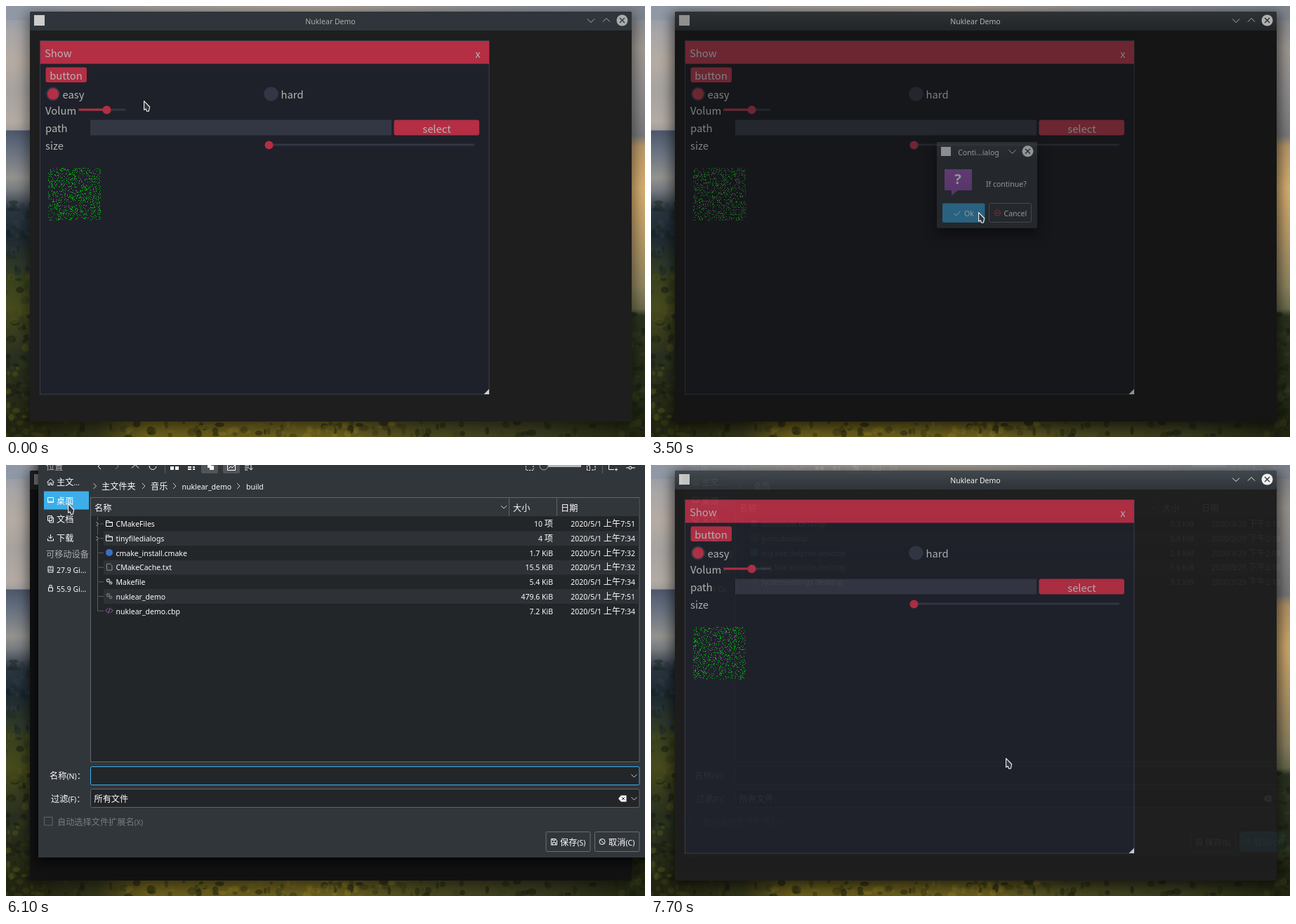
An HTML page that plays this animation: 910x615 px, repeating every 8 s.

```html
<!DOCTYPE html>
<html lang="en">
<head>
<meta charset="utf-8">
<title>Nuklear Demo</title>
<style>
html, body { margin: 0; width: 100%; height: 100%; overflow: hidden; background: #1e1e1e; }
svg { display: block; width: 910px; height: 615px; }
text { fill: #fcfcfc; }
.ui { font: 12.2px "Noto Sans", "Noto Sans CJK SC", sans-serif; }
.cjk { font-family: "Noto Sans CJK SC", sans-serif; }
.nk { font: 14.8px "Noto Sans CJK SC", sans-serif; fill: #b4b4b4; }
.shade { filter: blur(9px); }
</style>
</head>
<body>
<svg id="stage" viewBox="0 0 910 615"></svg>
<script>
const stage = document.getElementById("stage");
const RED = "#b42e44", DARK = "#323645", BLUE = "#3daee9", UI = "#31363b", VIEW = "#232629", WHITE = "#fcfcfc", EDGE = "#616569";

function el(parent, tag, attrs = {}) {
  const node = document.createElementNS("http://www.w3.org/2000/svg", tag);
  for (const k in attrs) node.setAttribute(k, attrs[k]);
  parent.append(node);
  return node;
}
const group = (parent, attrs) => el(parent, "g", attrs);
const rect = (g, x, y, width, height, fill, more) => el(g, "rect", { x, y, width, height, fill, ...more });
const disc = (g, cx, cy, r, fill, more) => el(g, "circle", { cx, cy, r, fill, ...more });
const line = (g, d, stroke = WHITE, more) => el(g, "path", { d, stroke, fill: "none", ...more });
const shape = (g, d, fill) => el(g, "path", { d, fill });
const show = (node, on) => node.setAttribute("display", on ? "inline" : "none");

// Interface text is condensed; use a smaller regular face when no condensed one exists.
const pen = document.createElement("canvas").getContext("2d");
const narrow = ["Noto Sans", "Open Sans"].find(f => {
  pen.font = `condensed 12.2px "${f}"`;
  return pen.measureText("chromium.desktop").width < 99;
});
const latin = narrow
  ? `font-family:"${narrow}",sans-serif;font-stretch:condensed`
  : "font-size:10.5px";

function label(g, x, y, str, more) {
  const t = el(g, "text", { x, y, class: "ui", ...more });
  for (const part of str.split(/([\u2e80-\uffef]+)/)) {
    if (!part) continue;
    const cjk = part.charCodeAt(0) > 0x2e7f;
    el(t, "tspan", cjk ? { class: "cjk" } : { style: latin }).textContent = part;
  }
  return t;
}
const nk = (g, x, y, str, more) => {
  const t = el(g, "text", { x, y, class: "nk", ...more });
  t.textContent = str;
  return t;
};
const MID = { "text-anchor": "middle" }, END = { "text-anchor": "end" };

const defs = el(stage, "defs");
function gradient(id, stops, across) {
  const last = stops[stops.length - 1][0];
  const g = el(defs, "linearGradient", { id, x1: 0, y1: 0, x2: across ? 1 : 0, y2: across ? 0 : 1 });
  for (const [pos, color] of stops) el(g, "stop", { offset: pos / last, "stop-color": color });
  return `url(#${id})`;
}
function random(seed) {
  let s = (seed * 7919 + 12345) >>> 0;
  return () => {
    s = (s + 0x6d2b79f5) >>> 0;
    let r = Math.imul(s ^ (s >>> 15), s | 1);
    r ^= r + Math.imul(r ^ (r >>> 7), r | 61);
    return ((r ^ (r >>> 14)) >>> 0) / 4294967296;
  };
}

function wallpaper(g) {
  rect(g, 0, 0, 60, 615, gradient("west", [[0, "#8d97a6"], [40, "#a9a6a6"], [80, "#b5aba2"], [120, "#a6a29f"],
    [165, "#b3aaa3"], [177, "#a39f9d"], [178, "#4c586b"], [205, "#66707f"], [245, "#93928f"], [262, "#777c80"],
    [290, "#2b3540"], [330, "#1f2a33"], [390, "#37401f"], [430, "#474a1c"], [500, "#2a3020"], [615, "#24260f"]]));
  rect(g, 860, 0, 50, 615, gradient("east", [[0, "#7f858e"], [60, "#a09a93"], [130, "#8c8b8c"], [185, "#7b7b7d"],
    [200, "#b9996a"], [260, "#d8b070"], [330, "#b79a68"], [400, "#8f8560"], [432, "#6d6c4c"], [442, "#2a3320"], [615, "#20260f"]]));
  rect(g, 0, 0, 910, 20, gradient("north", [[0, "#8f98a6"], [200, "#a09d9b"], [450, "#aaa196"], [700, "#8c8f96"], [910, "#7f858e"]], true));
  rect(g, 0, 580, 910, 35, gradient("south", [[0, "#22240f"], [130, "#33341a"], [200, "#6b5f1c"], [470, "#6a601f"],
    [600, "#4a4a22"], [760, "#3a3c20"], [910, "#20260f"]], true));
  const rnd = random(4);
  const leaves = (n, x, y, w, h, colors) => {
    for (let i = 0; i < n; i++)
      el(g, "ellipse", { cx: x + rnd() * w, cy: y + rnd() * h, rx: 2 + rnd() * 5, ry: 2 + rnd() * 4,
        fill: colors[Math.floor(rnd() * colors.length)], opacity: 0.55 });
  };
  leaves(40, 0, 280, 38, 110, ["#18222b", "#2c3842", "#1d2a24"]);
  leaves(70, 0, 385, 38, 220, ["#1b2114", "#4f5118", "#2e3a1c", "#171c12"]);
  leaves(50, 890, 440, 20, 170, ["#171e12", "#333d20", "#262f1c"]);
  leaves(90, 0, 594, 910, 22, ["#22260f", "#3a3c18", "#191c0e"]);
  leaves(50, 170, 596, 400, 20, ["#8a7822", "#3c3a14", "#766a24"]);
}

const chevron = (g, x, y, dir, stroke = WHITE, s = 4) => {
  const d = { down: [-s, -s / 2, s, s, s, -s], up: [-s, s / 2, s, -s, s, s],
    right: [-s / 2, -s, s, s, -s, s], left: [s / 2, -s, -s, s, s, s] }[dir];
  return line(g, `M${x + d[0]} ${y + d[1]}l${d[2]} ${d[3]}l${d[4]} ${d[5]}`, stroke);
};
function closeButton(g, x, y) {
  const d = disc(g, x, y, 8, WHITE);
  line(g, `M${x - 3.5} ${y - 3.5}l7 7m0 -7l-7 7`, UI, { "stroke-width": 1.3 });
  return d;
}

function mainWindow(g) {
  rect(g, 34, 8, 857, 585, "#1e1e1e", { rx: 3 });
  rect(g, 34, 8, 857, 27, "#2f353a", { rx: 3 });
  const glow = rect(g, 34, 8, 857, 27, gradient("bar", [[0, "#42494e"], [1, "#2f343a"]]), { rx: 3 });
  rect(g, 40, 13, 15, 15, "#cdcdcd");
  const marks = group(g);
  label(marks, 462, 25.5, "Nuklear Demo", MID);
  chevron(marks, 833, 21, "down", WHITE, 5);
  chevron(marks, 855, 20, "up", WHITE, 5);
  closeButton(marks, 877.5, 20.5);

  rect(g, 48.5, 49.5, 639.5, 504.5, "#1e2129", { stroke: "#3a3d4e" });
  rect(g, 49, 50, 639, 32.5, RED);
  nk(g, 55, 73, "Show");
  nk(g, 672, 73.5, "x", MID);
  rect(g, 56.5, 87.5, 58.5, 21.5, RED, { rx: 3 });
  nk(g, 85.5, 105, "button", MID);
  disc(g, 67, 125.5, 10, DARK);
  disc(g, 67, 125.5, 8, RED);
  nk(g, 80.5, 132, "easy");
  disc(g, 377.5, 125.5, 10.3, DARK);
  nk(g, 391.5, 132, "hard");
  nk(g, 56, 154.5, "Volum");
  rect(g, 103.5, 146.5, 66.5, 3, DARK);
  rect(g, 103.5, 146.5, 40, 3, RED);
  disc(g, 143.5, 148.3, 6, RED);
  nk(g, 56, 179.5, "path");
  rect(g, 120, 162.5, 429, 22, "#333743");
  const select = rect(g, 552.5, 162.5, 121.5, 22, RED, { rx: 3 });
  nk(g, 613.5, 180.5, "select", MID);
  nk(g, 56, 205, "size");
  rect(g, 374, 196.5, 293, 3, DARK);
  disc(g, 374.5, 198.5, 6, RED);
  shape(g, "M688 546.5V554H680.5Z", "#d0d0d0");
  const dots = ["#00b80c", "#9a3fa8"].map(fill => el(g, "path", { fill, "shape-rendering": "crispEdges" }));
  return { glow, marks, select, dots };
}

function speckle(paths, seed) {
  const rnd = random(seed + 1);
  const cells = n => Array.from({ length: n }, () => `M${60 + Math.floor(rnd() * 75)} ${231 + Math.floor(rnd() * 75)}h1v1h-1z`).join("");
  paths[0].setAttribute("d", cells(800));
  paths[1].setAttribute("d", cells(110));
}

function question(g) {
  rect(g, 405, 200, 147, 127, "#000", { class: "shade", opacity: 0.75 });
  rect(g, 407, 194, 143, 123, UI, { rx: 2 });
  rect(g, 407, 194, 143, 27, gradient("bar2", [[0, "#3c4247"], [1, UI]]), { rx: 2 });
  rect(g, 413, 201, 14, 13, "#eceeee");
  label(g, 466.5, 212.5, "Conti...ialog", MID);
  chevron(g, 514.5, 208, "down", WHITE, 5);
  closeButton(g, 536.5, 207.3);
  shape(g, "M418 233H457V263H437L428 270.5V263H418Z", gradient("violet", [[0, "#9b59b6"], [1, "#8e4cae"]]));
  el(g, "text", { x: 437, y: 254, class: "ui", style: "font-size:20px;font-weight:600", fill: WHITE, ...MID }).textContent = "?";
  label(g, 477, 257.5, "If continue?");
  const ok = rect(g, 415, 281.5, 60.5, 27.5, BLUE, { rx: 2 });
  line(g, "M431.5 296l3 3l6 -6.5");
  label(g, 446, 300, "Ok");
  rect(g, 481.5, 281.5, 60, 27, UI, { rx: 2, stroke: "#6b6f73" });
  disc(g, 493.5, 295.3, 4, "none", { stroke: "#da4453" });
  line(g, "M491 295.3h5", "#da4453");
  label(g, 502.5, 300, "Cancel");
  return ok;
}

const folderIcon = (g, x, y) => line(g, `M${x - 4.5} ${y + 4}v-8h4l1 2h4v6z M${x - 4.5} ${y - 1.5}h9`);
const icons = {
  dir: folderIcon,
  round: (g, x, y, c) => disc(g, x, y, 5, c),
  square: (g, x, y, c) => rect(g, x - 5, y - 5, 10, 10, c),
  page: (g, x, y) => line(g, `M${x - 3.5} ${y - 4.5}h5l2.5 2.5v6.5h-7.5z`, "#8a8e91"),
  gear: (g, x, y, c) => {
    disc(g, x - 1.5, y - 1.5, 2, "none", { stroke: c, "stroke-width": 1.4 });
    disc(g, x + 2.2, y + 2, 1.6, "none", { stroke: c, "stroke-width": 1.4 });
  },
  code: (g, x, y) => line(g, `M${x - 2} ${y - 3}l-3 3l3 3M${x + 2} ${y - 3}l3 3l-3 3M${x + 1} ${y - 4}l-2 8`, "#a566c0")
};

function fileList(parent, cols, day, rows) {
  const g = group(parent);
  rows.forEach(([icon, color, name, size, time], i) => {
    const y = 84 + i * 20.7;
    if (i % 2) rect(g, 139, y - 10.3, 762.5, 20.7, "#2e3236");
    line(g, `M130.5 ${y - (i ? 20 : 10)}V${y}H139`, "#5a5f63");
    if (icon === "dir") {
      rect(g, 127, y - 5, 7, 10, VIEW);
      chevron(g, 130, y, "right", "#c8cacb", 3);
    }
    icons[icon](g, 147, y - 0.5, color);
    label(g, 156.5, y + 4.3, name);
    label(g, cols.size, y + 4.3, size, END);
    label(g, 896, y + 4.3, `${day} ${time}`, END);
  });
  line(g, `M${cols.a} 46V73M${cols.b} 46V73`, EDGE);
  chevron(g, cols.a - 7.5, 60, "down", "#d0d2d3");
  label(g, cols.a + 5.5, 65.5, "大小");
  label(g, cols.b + 5.5, 65.5, "日期");
  return g;
}

function toolbar(g) {
  rect(g, 278, -12, 24, 24, "#50555a", { rx: 2 });
  rect(g, 309, -12, 24, 24, "#50555a", { rx: 2 });
  chevron(g, 133, 2, "left");
  chevron(g, 158, 2, "right", "#85898c");
  chevron(g, 184, 2, "up", WHITE, 5);
  line(g, "M204 1a5 5 0 1 0 10 1M214 0v-4");
  line(g, "M226.5 0V12M849.5 0V12", "#5b6064");
  for (const x of [234, 241]) rect(g, x, 2, 5, 5, WHITE);
  line(g, "M259 3h5M259 6h5M266 3h3M266 6h3", WHITE, { "stroke-width": 2 });
  rect(g, 287, -2, 5, 6, WHITE);
  rect(g, 290, 1, 6, 6, WHITE);
  line(g, "M315.5 -2V7.5H326.5V-2M317 5l3 -3l2 2l4 -4");
  line(g, "M340 1h6M340 4h6M340 7h4M349 -2v9l-2.5 -2.5m2.5 2.5l2.5 -2.5");
  line(g, "M740.5 -2V7.5H751V-2", WHITE, { "stroke-dasharray": "2 1.5" });
  rect(g, 770, 0, 49, 3, "#b5b8ba");
  disc(g, 766, 1, 6, UI, { stroke: "#a5a8ab" });
  line(g, "M827.5 7.5V1h4V7.5zM834 7h5V-2", WHITE, { "stroke-dasharray": "3 1" });
  line(g, "M858.5 -3V6.5H866M867 6.5h4m-2 -2v4");
  line(g, "M883 4h4m4 0h5");
  disc(g, 889, 4, 2, "none", { stroke: WHITE });
}

function fileDialog(g) {
  rect(g, 44, -20, 900, 588, "#000", { class: "shade", opacity: 0.7 });
  rect(g, 46, -10, 880, 570, UI);
  label(g, 57, 7, "位置", { opacity: 0.65 });
  toolbar(g);

  const place = rect(g, 54, 37.5, 64, 26, BLUE);
  line(g, "M58.5 24.5l5 -4.5l5 4.5M60 24v4.5h2.5v-3h2v3h2.5V24");
  line(g, "M59.5 46.5h8v7h-8zM59.5 52h8");
  line(g, "M59.5 72.5h6v7h-6zM62 75h5.500v7h-5.500z");
  line(g, "M63.5 99v6l-3 -3m3 3l3 -3M59.5 105v3h8v-3");
  line(g, "M60 145h7v8h-7zM60 150h7M62 147h3");
  line(g, "M60.500 175h6v5h-6zM62 175v-3.500h3v3.500");
  ["主文...", "桌面", "文档", "下载"].forEach((s, i) => label(g, 72, 29 + i * 26.6, s));
  label(g, 57, 132, "可移动设备", { opacity: 0.6 });
  label(g, 72, 154, "27.9 Gi...");
  label(g, 72, 180.5, "55.9 Gi...");

  rect(g, 120.5, 46.5, 781.5, 377, VIEW, { stroke: EDGE });
  rect(g, 121, 47, 780.5, 26, UI);
  label(g, 126, 65.5, "名称");
  chevron(g, 126.5, 30, "right", "#c8cacb");

  const build = fileList(g, { a: 716.5, b: 784.5, size: 779 }, "2020/5/1", [
    ["dir", "", "CMakeFiles", "10 项", "上午7:51"],
    ["dir", "", "tinyfiledialogs", "4 项", "上午7:34"],
    ["round", "#3b6fc4", "cmake_install.cmake", "1.7 KiB", "上午7:32"],
    ["page", "", "CMakeCache.txt", "15.5 KiB", "上午7:32"],
    ["gear", "#b5b8ba", "Makefile", "5.4 KiB", "上午7:34"],
    ["gear", "#6d7275", "nuklear_demo", "479.6 KiB", "上午7:51"],
    ["code", "", "nuklear_demo.cbp", "7.2 KiB", "上午7:34"]
  ]);
  label(build, 136, 35, "主文件夹");
  label(build, 206, 35, "音乐");
  label(build, 250.5, 34.5, "nuklear_demo");
  label(build, 342, 34.5, "build", { "font-weight": 700 });
  for (const x of [196, 240, 331]) chevron(build, x, 30, "right", "#c8cacb");

  const desktop = fileList(g, { a: 722.5, b: 778.5, size: 773 }, "2020/3/29", [
    ["round", "#5b8fd9", "chromium.desktop", "5.3 KiB", "下午2:10"],
    ["square", "#3f8f4a", "gvim.desktop", "5.0 KiB", "下午2:10"],
    ["square", BLUE, "org.kde.dolphin.desktop", "2.8 KiB", "下午2:09"],
    ["square", "#50565b", "org.kde.konsole.desktop", "9.6 KiB", "下午2:10"],
    ["square", "#3b4247", "systemsettings.desktop", "9.2 KiB", "下午2:10"]
  ]);
  label(desktop, 145, 35, "桌面", { "font-weight": 700 });

  label(g, 62, 448, "名称(N)：");
  label(g, 64, 481, "过滤(F)：");
  const field = rect(g, 120.5, 430.5, 781.5, 26, VIEW, { rx: 2, stroke: BLUE });
  rect(g, 120.5, 462.5, 781.5, 26, VIEW, { rx: 2, stroke: EDGE });
  chevron(g, 894.5, 443.5, "down", "#c8cacb");
  chevron(g, 894.5, 476, "down", "#c8cacb");
  label(g, 125.500, 481, "所有文件");
  shape(g, "M872 476l4 -4.500h7.500v9h-7.500z", WHITE);
  line(g, "M877 474l4 4m0 -4l-4 4", VIEW);
  rect(g, 54.5, 502.500, 11.500, 11.500, "none", { stroke: "#5f6468" });
  label(g, 73, 514, "自动选择文件扩展名(X)", { opacity: 0.35 });
  const button = x => rect(g, x, 523.5, 63.5, 28, UI, { rx: 2, stroke: "#6b6f73" });
  button(769).setAttribute("width", 63);
  const cancel = button(838.5);
  line(g, "M776.5 533.5h6l2 2v6.500h-8zM778.500 533.500v2.500h3.500v-2.500M778.500 542v-3.500h4v3.500");
  label(g, 789, 542.5, "保存(S)");
  disc(g, 849, 537.500, 4, "none", { stroke: WHITE });
  line(g, "M846.200 534.700l5.600 5.600");
  label(g, 858, 542.5, "取消(C)");
  return { place, build, desktop, field, cancel };
}

wallpaper(group(stage));
const shadow = rect(stage, 30, 10, 865, 592, "#000", { class: "shade" });
const win = group(stage);
const ui = mainWindow(win);
const ask = group(stage);
const okButton = question(ask);
const files = group(stage);
const fd = fileDialog(files);
const cursor = el(stage, "path", { d: "M.6 .6V13.200L3.200 11.800L4.600 15.200L7.300 15.200L8.700 9Z", fill: "#33383c",
  stroke: "#f4f4f4", "stroke-width": 1.1, "stroke-linejoin": "round" });

// Tables of [ms, value...]
const path = [[0, 196, 135], [600, 105, 95], [900, 104, 94], [1300, 113, 111], [1600, 113, 111], [1700, 393, 206],
  [2100, 468, 301], [2400, 466, 294], [3500, 466, 294], [4300, 599, 176], [4400, 606, 169], [5200, 606, 169],
  [6000, 90, 52], [6100, 88, 55], [6300, 88, 55], [6500, 150, 72], [6700, 185, 95], [7400, 857, 532],
  [7500, 859, 534], [7600, 859, 534], [7700, 505, 418]];
const dimming = [[800, 0], [1500, 1], [3400, 1], [3500, 0.75], [3900, 0], [4800, 0], [4900, 0.2], [5200, 0.2],
  [5700, 1], [7500, 1], [7600, 0.5], [7700, 0]];
const askFade = [[800, 0], [1200, 1], [3400, 1], [3500, 0.55], [3800, 0]];
const fileFade = [[5100, 0], [5500, 1], [7500, 1], [7600, 0.5], [7700, 0.06]];

function at(table, t) {
  const i = table.findIndex(row => row[0] > t);
  if (i < 0) return table[table.length - 1].slice(1);
  if (i === 0) return table[0].slice(1);
  const a = table[i - 1], b = table[i], k = (t - a[0]) / (b[0] - a[0]);
  return a.slice(1).map((v, n) => v + (b[n + 1] - v) * k);
}
const within = (t, a, b) => t >= a && t < b;

let drawn = -1, seed = -1;
function render(t) {
  const [x, y] = at(path, t), [dim] = at(dimming, t), [askOn] = at(askFade, t), [fileOn] = at(fileFade, t);
  cursor.setAttribute("transform", `translate(${Math.round(x)} ${Math.round(y)})`);
  win.style.filter = dim ? `brightness(${1 - 0.4 * dim}) saturate(${1 - 0.35 * dim})` : "none";

  const active = within(t, 3500, 4900) || t >= 7600;
  show(ui.glow, active);
  ui.marks.setAttribute("opacity", active ? 1 : 0.6);
  shadow.setAttribute("opacity", active ? 0.6 : 0.45);
  ui.select.setAttribute("fill", within(t, 4300, 5200) ? "#be3449" : RED);

  show(ask, askOn > 0);
  ask.setAttribute("opacity", askOn);
  okButton.setAttribute("fill", t >= 3000 ? "#3a9fd6" : BLUE);

  show(files, fileOn > 0);
  files.setAttribute("opacity", fileOn);
  const moved = t >= 6200;
  show(fd.build, !moved);
  show(fd.desktop, moved);
  fd.place.setAttribute("fill", within(t, 6000, 6500) ? BLUE : moved ? "#22506a" : UI);
  fd.field.setAttribute("stroke", moved ? EDGE : BLUE);
  fd.cancel.setAttribute("fill", t >= 7400 ? BLUE : UI);
  fd.cancel.setAttribute("stroke", t >= 7400 ? BLUE : "#6b6f73");

  const step = t / 100;
  const next = t < 3500 ? Math.min(step, 7) : t < 7600 ? Math.min(step, 44) : Math.min(step, 77);
  if (next !== seed) speckle(ui.dots, seed = next);
}

const start = performance.now();
function tick() {
  const t = Math.floor(((performance.now() - start) % 8000) / 100) * 100;
  if (t !== drawn) render(drawn = t);
  requestAnimationFrame(tick);
}
tick();
</script>
</body>
</html>
```
